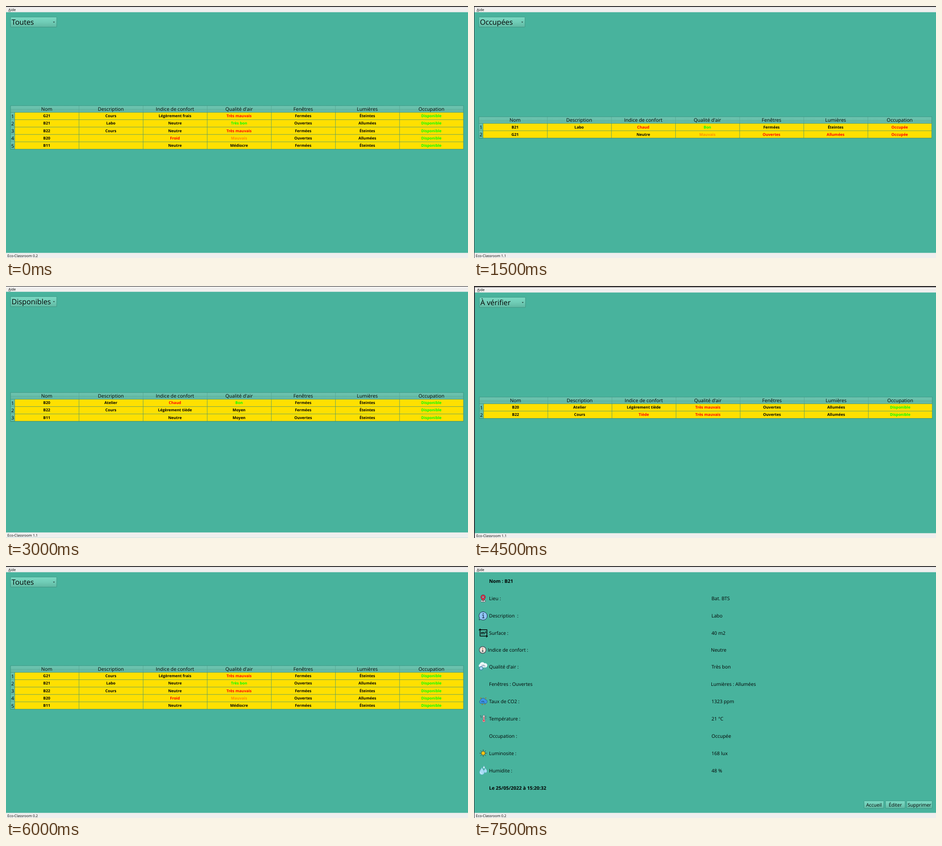
These frames come from a looping animation (1012 px wide and 553 px high, 8000 ms). An HTML page:

```html
<!DOCTYPE html>
<html lang="fr">
<head>
<meta charset="utf-8">
<title>Eco-Classroom</title>
<style>
html, body { margin: 0; width: 100%; height: 100%; overflow: hidden; background: #48b39d; }
svg { display: block; width: 100%; height: 100%; font-family: "Open Sans", "Noto Sans", sans-serif; }
text { text-rendering: geometricPrecision; white-space: pre; }
.head { font-size: 10.65px; text-anchor: middle; }
.cell { font-size: 8.45px; font-weight: 700; text-anchor: middle; }
.combo { font-size: 15.8px; }
.bar { font-size: 7.8px; }
.info { font-size: 10.5px; }
.strong { font-size: 10.5px; font-weight: 700; }
.button { font-size: 10.45px; text-anchor: middle; }
</style>
</head>
<body>
<svg id="stage" viewBox="0 0 1012 553" preserveAspectRatio="none">
  <defs>
    <linearGradient id="button" x2="0" y2="1">
      <stop offset="0" stop-color="#7ad9c3"/><stop offset=".48" stop-color="#71cdb7"/>
      <stop offset="1" stop-color="#60b8a2"/>
    </linearGradient>
    <linearGradient id="header" x2="0" y2="1">
      <stop offset="0" stop-color="#6dc4b0"/><stop offset=".5" stop-color="#68bfaa"/>
      <stop offset=".52" stop-color="#61b5a1"/><stop offset="1" stop-color="#69bfab"/>
    </linearGradient>
    <g id="icons" stroke-linecap="round" stroke-linejoin="round">
      <g stroke="#3c2b35" stroke-width=".7">
        <ellipse cx="20" cy="77" rx="5.4" ry="2" fill="#e6eef0"/>
        <path d="M20 77.2C17.6 73.4 14.8 71 14.8 68.3A5.2 5.2 0 0 1 25.2 68.3C25.2 71 22.4 73.4 20 77.2Z" fill="#e0344b"/>
        <circle cx="20" cy="68.3" r="2.1" fill="#8fd3e8"/>
      </g>
      <path d="M20 100.4A9.1 9.1 0 1 1 14.6 116.9L11.2 118.3 12.2 114.4A9.1 9.1 0 0 1 20 100.4Z" fill="#8fc4f4" stroke="#15233f" stroke-width="1"/>
      <path d="M18.6 107.9H20.5V113.6M18.4 113.8H22.3" fill="none" stroke="#15233f" stroke-width="1.3"/>
      <circle cx="20.2" cy="104.7" r="1.1" fill="#15233f"/>
      <g fill="none" stroke="#000" stroke-width="1.5">
        <path d="M13.3 138.5V153.8H29M11.2 140.6 13.3 138.2 15.4 140.6M27.2 151.7 29.6 153.8 27.2 156M16 139.7H28.4V150.5"/>
      </g>
      <text x="14.7" y="150.3" font-size="9.2" font-weight="700">m²</text>
      <circle cx="19" cy="184.2" r="7.4" fill="#eeeae1" stroke="#4d565d" stroke-width="1.6"/>
      <circle cx="19" cy="184.2" r="5.2" fill="none" stroke="#7b8587" stroke-width="1" stroke-dasharray=".6 2.1" stroke-linecap="butt"/>
      <path d="M19 180.2V185.5" stroke="#d14438" stroke-width="1.2"/>
      <rect x="17.5" y="185" width="3" height="3.4" rx=".7" fill="#485760"/>
      <path d="M13 222.6A4 4 0 0 1 13 215.2 5.4 5.4 0 0 1 22.7 213.5 4.8 4.8 0 0 1 28.5 220.3Q28 222.6 25.5 222.6Z" fill="#eef7fa" stroke="#b9dce4" stroke-width=".6"/>
      <text x="16.8" y="219.8" font-size="4.5" font-weight="700" fill="#486a86">CO₂</text>
      <circle cx="15.6" cy="224.3" r="3.7" fill="#a8dcf4" stroke="#326aa0" stroke-width="1.1"/>
      <path d="M18.4 227.1 20.2 229M22.4 224.3 24 227.4M26 223.9 28.2 227" stroke="#5aa7b7" stroke-width="1" fill="none"/>
      <path d="M14.6 301.6A3.6 3.6 0 0 1 14.3 294.8 5.6 5.6 0 0 1 24.8 293.2 4.3 4.3 0 0 1 26 301.6Z" fill="#3e94e6" stroke="#24577f" stroke-width=".8"/>
      <text x="16.1" y="299.2" font-size="4" font-weight="700" fill="#123c65">CO₂</text>
      <g fill="#d58a35" stroke="#6c5a35" stroke-width=".4">
        <circle cx="15" cy="290" r="1.1"/><circle cx="25.5" cy="289.8" r="1"/><circle cx="18" cy="303.8" r="1.1"/><circle cx="23.8" cy="303.4" r="1"/>
      </g>
      <path d="M19.8 337V329A1.8 1.8 0 0 1 23.4 329V337A3.2 3.2 0 1 1 19.8 337Z" fill="#f2ede9" stroke="#535764" stroke-width=".8"/>
      <circle cx="21.6" cy="339.4" r="2" fill="#df3d4b"/>
      <path d="M21.6 331.5V339" stroke="#df3d4b" stroke-width="1.3"/>
      <path d="M25.2 329.5H27M25.2 332H26.3M25.2 334.5H27M15 329.8H17.6M15 329.8V332.5H17.2" stroke="#535764" stroke-width=".7" fill="none"/>
      <circle cx="14.1" cy="328.4" r=".7" fill="none" stroke="#535764" stroke-width=".5"/>
      <circle cx="20.2" cy="410.8" r="4.3" fill="#fcc516" stroke="#302e20" stroke-width=".9"/>
      <g id="rays" stroke="#302e20" stroke-width="1"></g>
      <g fill="#a9dcf5" stroke="#6eb4dc" stroke-width=".5">
        <path d="M17.2 442.4C19 446 22.4 449 22.4 452.8A5.1 5.1 0 0 1 12.2 452.8C12.2 449 15.8 446 17.2 442.4Z"/>
        <path d="M25 443.8C26.2 446.4 28.3 447.8 28.3 450.2A3.3 3.3 0 0 1 21.7 450.2C21.7 447.8 24 446.4 25 443.8Z"/>
        <path d="M21.8 438.6C22.5 440.3 23.6 441.3 23.6 442.6A1.8 1.8 0 0 1 20 442.6C20 441.3 21.1 440.3 21.8 438.6Z" fill="#dff3fb"/>
      </g>
      <path d="M14.2 452.6A3.2 3.2 0 0 0 16.8 455.8" fill="none" stroke="#eefaff" stroke-width=".9"/>
    </g>
  </defs>
</svg>
<script>
const NS = "http://www.w3.org/2000/svg";
const stage = document.getElementById("stage");
const LOOP = 8000;
const RED = "#ff0000", LIME = "#00ff00", ORANGE = "#ff8c00";
const EDGE = "#398f7d", GRID = "#559e68", YELLOW = "#ffe000";
const HEADS = ["Nom", "Description", "Indice de confort", "Qualité d'air", "Fenêtres", "Lumières", "Occupation"];
const TINTS = {
  "Froid": RED, "Chaud": RED, "Tiède": RED, "Très mauvais": RED, "Occupée": RED,
  "Mauvais": ORANGE, "Bon": LIME, "Très bon": LIME, "Disponible": LIME
};
const COL = 140.43, ROW = 16.2;

function add(parent, tag, attrs, content) {
  const el = document.createElementNS(NS, tag);
  for (const key in attrs) el.setAttribute(key, attrs[key]);
  if (content !== undefined) el.textContent = content;
  parent.appendChild(el);
  return el;
}
const box = (g, x, y, width, height, fill, more) => add(g, "rect", { x, y, width, height, fill, ...more });
const label = (g, x, y, kind, text, fill = "#000") => add(g, "text", { x, y, class: kind, fill }, text);
const line = (g, x1, y1, x2, y2, stroke) => add(g, "line", { x1, y1, x2, y2, stroke, "stroke-width": 0.9 });

// Window chrome; returns a group shifted with the window.
function frame({ dx = 0, dy = 0, top, left = 0, version }) {
  const scene = add(stage, "g", { visibility: "hidden" });
  box(scene, 0, 0, 1012, 553, "#48b39d");
  box(scene, 0, 0, 1012, 13.6 + dy, "#f0efee");
  box(scene, 0, 541.7 + dy, 1012, 12, "#efefee");
  box(scene, 0, 0, 1012, top, "#2c2a2b");
  if (left) box(scene, 0, 0, left, 553, "#302a2e");
  const g = add(scene, "g", { transform: `translate(${dx} ${dy})` });
  label(g, 5.3, 10.8, "bar", "Aide");
  box(g, 5.3, 11.7, 5, 0.6, "#000");
  label(g, 3.1, 550.6, "bar", "Eco-Classroom " + version);
  return { scene, g };
}

function button(g, x, y, w, h) {
  box(g, x, y, w, h, "url(#button)", { rx: 1, stroke: EDGE, "stroke-width": 0.8 });
}

function table(g, y, rows) {
  const body = y + 14.5, bottom = body + rows.length * ROW, right = 19 + 7 * COL;
  box(g, 10, y, right - 10, 14.5, "url(#header)");
  box(g, 19, body, right - 19, bottom - body, YELLOW);
  HEADS.forEach((name, c) => {
    const x = 19 + c * COL;
    label(g, x + COL / 2, y + 11.2, "head", name);
    if (c) {
      line(g, x + 0.5, y, x + 0.5, body, "#58a996");
      line(g, x + 0.5, body, x + 0.5, bottom, GRID);
    }
  });
  rows.forEach((row, r) => {
    const top = body + r * ROW;
    box(g, 10, top, 9, ROW, "url(#header)");
    label(g, 14.5, top + 12.4, "head", r + 1);
    line(g, 10, top + ROW, 19, top + ROW, EDGE);
    line(g, 19, top + ROW, right, top + ROW, GRID);
    row.split("|").forEach((text, c) => {
      const alert = text[0] === "!";
      const word = alert ? text.slice(1) : text;
      if (word) label(g, 19 + (c + 0.5) * COL, top + 10.9, "cell", word, alert ? RED : TINTS[word]);
    });
  });
  line(g, 10, body, right, body, EDGE);
  line(g, 19, body, 19, bottom, EDGE);
  box(g, 10, y, right - 10, bottom - y, "none", { stroke: EDGE, "stroke-width": 0.8 });
}

function list(win, filter, y, rows) {
  const { scene, g } = frame(win);
  button(g, 10, 24.2, 101, 22.1);
  label(g, 12.3, 41, "combo", filter);
  add(g, "path", { d: "M102.9 34.5H107.1L105 36.7Z", fill: "#1d3a34" });
  table(g, y, rows);
  return scene;
}

function details(win) {
  const { scene, g } = frame(win);
  const rows = [
    [71.5, "Lieu :", "Bat. BTS"], [109.5, "Description  :", "Labo"], [147.5, "Surface :", "40 m2"],
    [184.4, "Indice de confort :", "Neutre", 30.3, 519], [221, "Qualité d'air :", "Très bon"],
    [258.8, "Fenêtres : Ouvertes", "Lumières : Allumées", 33, 519],
    [296.8, "Taux de CO2 :", "1323 ppm"], [334.8, "Température :", "21 °C"],
    [372.8, "Occupation :", "Occupée"], [410.8, "Luminosite :", "168 lux"], [448.8, "Humidite :", "48 %"]
  ];
  label(scene, 33, 37.3, "strong", "Nom : B21");
  label(scene, 33, 490.5, "strong", "Le 25/05/2022 à 15:20:32");
  for (const [y, name, value, x = 33, vx = 520.3] of rows) {
    label(scene, x, y + 3.7, "info", name);
    label(scene, vx, y + 3.7, "info", value);
  }
  add(scene, "use", { href: "#icons" });
  for (const [x, w, text] of [[854.4, 43.2, "Accueil"], [901.4, 42.9, "Éditer"], [947.9, 55.7, "Supprimer"]]) {
    button(scene, x, 515.4, w, 16.4);
    label(scene, x + w / 2, 527.5, "button", text);
  }
  return scene;
}

const rays = document.getElementById("rays");
for (let i = 0; i < 8; i++) {
  const c = Math.cos(i * Math.PI / 4), s = Math.sin(i * Math.PI / 4);
  add(rays, "line", { x1: 20.2 + 6 * c, y1: 410.8 + 6 * s, x2: 20.2 + 7.6 * c, y2: 410.8 + 7.6 * s });
}

const all = list({ top: 2, version: "0.2" }, "Toutes", 218.8, [
  "G21|Cours|Légèrement frais|Très mauvais|Fermées|Éteintes|Disponible",
  "B21|Labo|Neutre|Très bon|Ouvertes|Allumées|Disponible",
  "B22|Cours|Neutre|Très mauvais|Fermées|Éteintes|Disponible",
  "B20||Froid|Mauvais|Ouvertes|Allumées|Disponible",
  "B11||Neutre|Médiocre|Fermées|Éteintes|Disponible"
]);
const busy = list({ dx: 0.7, top: 2, left: 0.9, version: "1.1" }, "Occupées", 243.1, [
  "B21|Labo|Chaud|Bon|Fermées|Éteintes|Occupée",
  "G21||Neutre|Mauvais|!Ouvertes|!Allumées|Occupée"
]);
const free = list({ dy: -0.9, top: 1.1, version: "1.1" }, "Disponibles", 234.8, [
  "B20|Atelier|Chaud|Bon|Fermées|Éteintes|Disponible",
  "B22|Cours|Légèrement tiède|Moyen|Fermées|Éteintes|Disponible",
  "B11||Neutre|Moyen|Ouvertes|Éteintes|Disponible"
]);
const check = list({ dx: 1.8, dy: 0.7, top: 2.6, left: 1.8, version: "1.1" }, "À vérifier", 243.1, [
  "B20|Atelier|Légèrement tiède|Très mauvais|Ouvertes|Allumées|Disponible",
  "B22|Cours|Tiède|Très mauvais|Ouvertes|Allumées|Disponible"
]);
const room = details({ dx: 1, top: 2, left: 1, version: "0.2" });

const steps = [[0, all], [1500, busy], [3000, free], [4500, check], [6000, all], [7500, room]];
const start = performance.now();
let shown = null;

function draw(now) {
  const t = Math.max(0, now - start) % LOOP;
  const scene = steps.filter(([at]) => at <= t).pop()[1];
  if (scene !== shown) {
    if (shown) shown.setAttribute("visibility", "hidden");
    scene.setAttribute("visibility", "visible");
    shown = scene;
  }
  requestAnimationFrame(draw);
}
draw(start);
</script>
</body>
</html>
```
